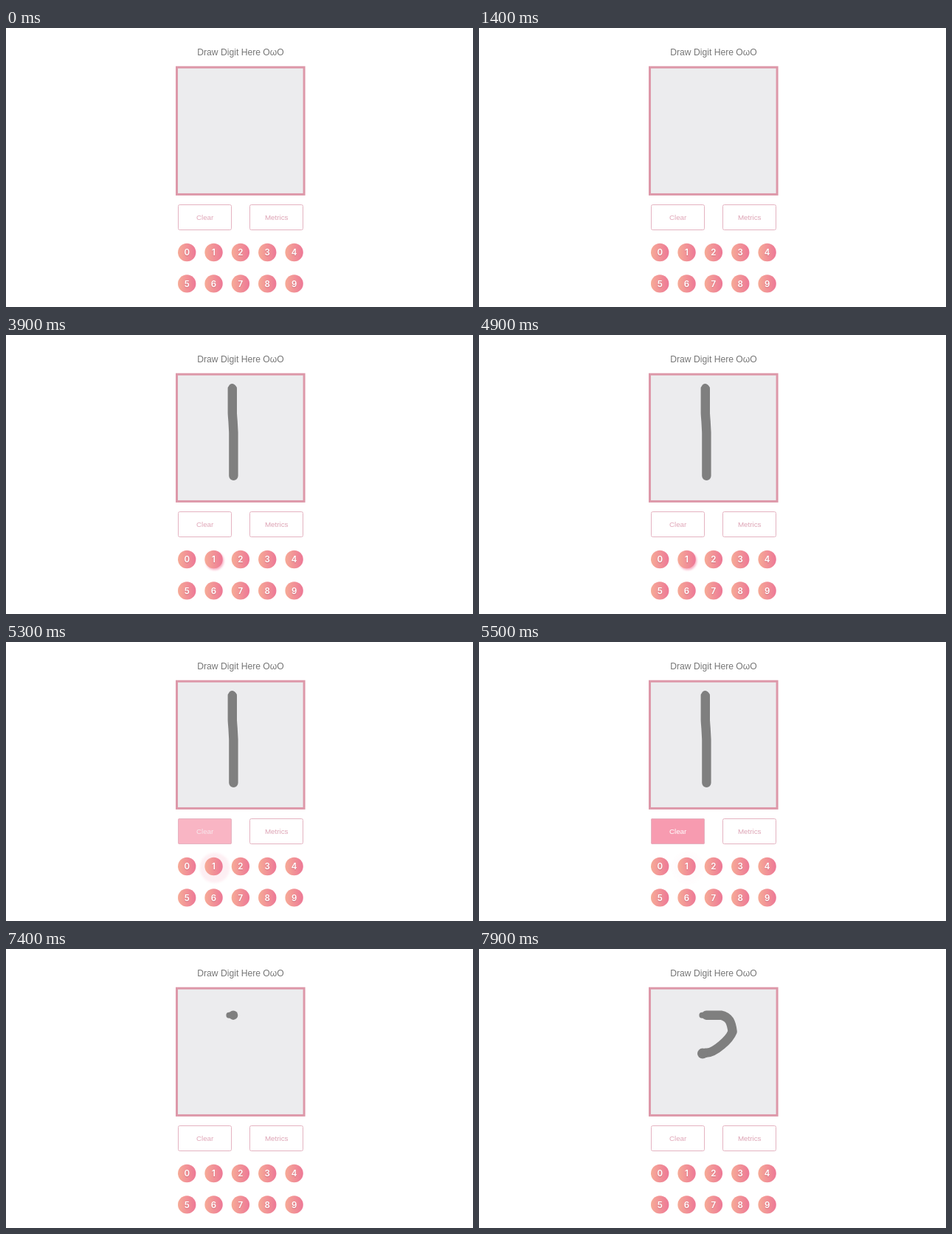
These frames come from a looping animation (633 by 378 pixels, 8 s). An HTML page:

```html
<!DOCTYPE html>
<html lang="en">
<head>
<meta charset="utf-8">
<style>
  html, body { margin: 0; width: 100%; height: 100%; overflow: hidden; background: #fff; }
  svg { display: block; }
  text { font-family: "Liberation Sans", Arial, sans-serif; text-anchor: middle; }
  .label { font-size: 9.8px; }
  .digit { font: 600 11.5px Inter, "Liberation Sans", sans-serif; fill: #fff; text-shadow: 0 1px 1px rgba(150, 60, 80, .35); }
  .ink { fill: none; stroke: #7f7f7f; stroke-width: 12.4; stroke-linecap: round; stroke-linejoin: round; }
  .blob { fill: #7f7f7f; }
  .outline { fill: none; stroke: #e4b3c1; }
</style>
</head>
<body>
<svg width="633" height="378" viewBox="0 0 633 378">
  <defs>
    <linearGradient id="skin">
      <stop offset="0" stop-color="#f6ab97"/>
      <stop offset="1" stop-color="#ed7896"/>
    </linearGradient>
    <filter id="soft" x="-50%" y="-50%" width="200%" height="200%">
      <feGaussianBlur stdDeviation="1.4"/>
    </filter>
  </defs>
  <text x="318" y="37" font-size="12.15" fill="#767676">Draw Digit Here OωO</text>
  <rect x="231.5" y="53.2" width="172.6" height="172.2" fill="#ececee" stroke="#dd98a9" stroke-width="3"/>

  <g id="one">
    <circle class="blob" cx="306.5" cy="70.3" r="4.3"/>
    <path class="ink" pathLength="1" d="M306.8 73 L306.8 106 Q307 110 307.6 117 L308.4 132 V190.8"/>
  </g>
  <g id="two">
    <circle class="blob" cx="302.4" cy="89.8" r="4"/>
    <path class="ink" pathLength="1" d="M308 89.7 H328 Q335 91 339.5 97 Q342.5 102 343.6 112 Q340 121 329 130 Q316 141 308 140.6 L303 141.8"/>
    <circle id="end" class="blob" cx="303" cy="141.6" r="7"/>
  </g>

  <rect id="fill" x="233" y="239" width="73" height="35" rx="2" fill="#f79bb0"/>
  <rect class="outline" x="233.5" y="239.5" width="72" height="34" rx="2"/>
  <rect class="outline" x="330.5" y="239.5" width="72" height="34" rx="2"/>
  <text id="clear" class="label" x="269.6" y="259.8">Clear</text>
  <text class="label" x="366.7" y="259.8" fill="#dda3b4">Metrics</text>

  <circle id="glow" cx="282.9" cy="306" fill="#f2688f" filter="url(#soft)"/>
  <g id="keys"></g>
</svg>
<script>
const $ = id => document.getElementById(id);
const clamp = x => Math.min(1, Math.max(0, x));
const ramp = (t, from, to) => clamp((t - from) / (to - from));
const smooth = x => x * x * (3 - 2 * x);

$("keys").innerHTML = [...Array(10).keys()].map(n => {
  const x = 245.2 + n % 5 * 36.35, y = n < 5 ? 304 : 346.4;
  return `<circle cx="${x}" cy="${y}" r="12.2" fill="url(#skin)"/>` +
    `<text class="digit" x="${x}" y="${y + 4.1}">${n}</text>`;
}).join("");

function draw(id, shown, part) {
  const group = $(id);
  group.style.display = shown ? "" : "none";
  group.querySelector("path").setAttribute("stroke-dasharray", `${Math.max(part, .001)} 3`);
}

function render(t) {
  // the first stroke pauses twice before its end
  let part = .912 * smooth(ramp(t, 2300, 2700));
  if (t >= 3100) part = .943;
  if (t >= 3200) part = .975;
  if (t >= 3900) part = 1;
  draw("one", t >= 2300 && t < 6000, part);

  const second = ramp(t, 7400, 7900);
  draw("two", t >= 7400, second);
  $("end").style.display = second === 1 ? "" : "none";

  // the recognised key pulses once a second until cleared
  const q = t < 6000 ? ramp((t - 3900) % 1000, 0, 700) : 0;
  const spread = 1 - (1 - q) ** 2;
  $("glow").setAttribute("r", 12.2 + 10 * spread);
  $("glow").style.opacity = t < 3900 ? 0 : .55 * (1 - spread) * (1 - ramp(t, 6000, 6300));

  const hover = smooth(ramp(t, 5100, 5400)) * (1 - smooth(ramp(t, 6640, 6900)));
  const mix = (a, b) => Math.round(a + (b - a) * hover);
  $("fill").style.opacity = hover;
  $("clear").style.fill = `rgb(${mix(224, 255)}, ${mix(167, 255)}, ${mix(184, 255)})`;
}

function tick() {
  render(Math.floor(performance.now() % 8000 / 100) * 100);
  requestAnimationFrame(tick);
}
tick();
</script>
</body>
</html>
```
